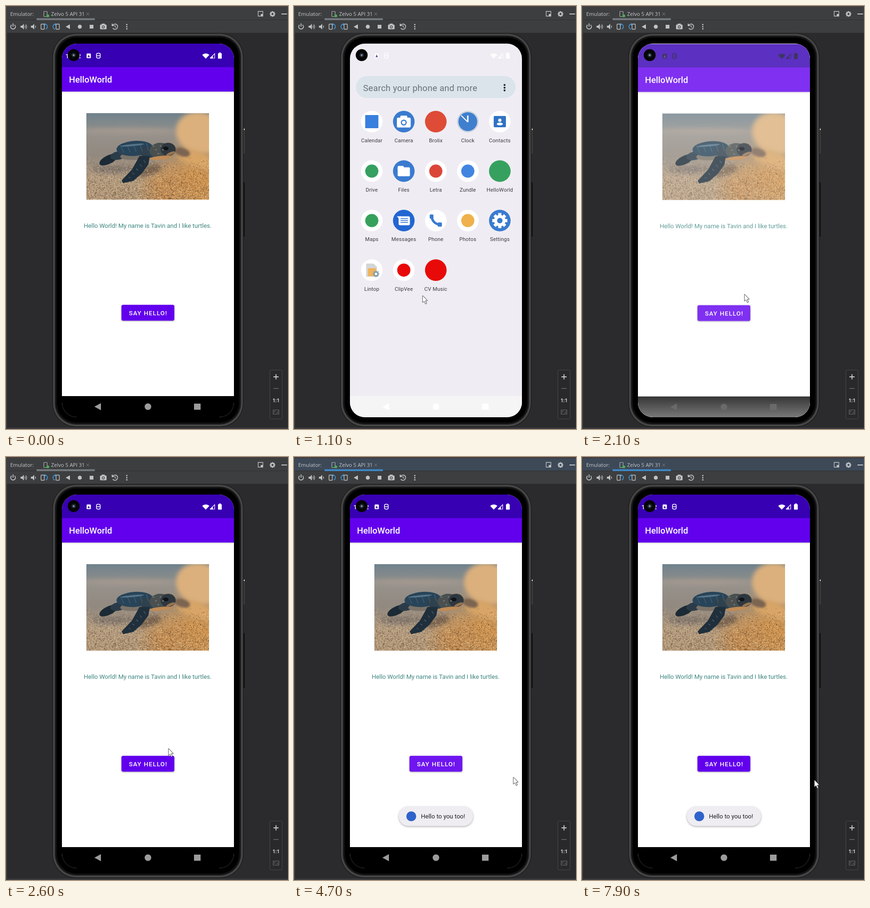
Animation, 600 px wide and 900 px high, one loop 8000 ms. Source, as an HTML page with a canvas:

```html
<!DOCTYPE html>
<html lang="en">
<head>
<meta charset="utf-8">
<title>Emulator demo</title>
<style>
html, body { margin: 0; width: 100%; height: 100%; overflow: hidden; background: #2b2b2e; }
canvas { display: block; width: 600px; height: 900px; }
</style>
</head>
<body>
<canvas id="stage" width="600" height="900"></canvas>
<script>
const LOOP = 8000, STEP = 100;
const UI = '"Open Sans", sans-serif', APP = 'Roboto, sans-serif';
const SCREEN = [119, 80, 366, 795, 32];
let c = document.getElementById('stage').getContext('2d');

const clamp = v => Math.max(0, Math.min(1, v));
const ramp = (t, a, b) => clamp((t - a) / (b - a));
const mix = (a, b, k) => a + (b - a) * k;

// Drawing helpers
function rect(x, y, w, h, color) { c.fillStyle = color; c.fillRect(x, y, w, h); }
function round(x, y, w, h, r, fill, stroke, lw = 1) {
  c.beginPath(); c.roundRect(x, y, w, h, r);
  if (fill) { c.fillStyle = fill; c.fill(); }
  if (stroke) { c.strokeStyle = stroke; c.lineWidth = lw; c.stroke(); }
}
function disc(x, y, r, color) {
  c.beginPath(); c.arc(x, y, r, 0, 7); c.fillStyle = color; c.fill();
}
function oval(x, y, rx, ry, turn, color) {
  c.beginPath(); c.ellipse(x, y, rx, ry, turn, 0, 7); c.fillStyle = color; c.fill();
}
function arc(x, y, r, a, b, color, lw) {
  c.beginPath(); c.arc(x, y, r, a, b); c.strokeStyle = color; c.lineWidth = lw; c.stroke();
}
function poly(points, color) {
  c.beginPath();
  points.forEach(([x, y]) => c.lineTo(x, y));
  c.closePath(); c.fillStyle = color; c.fill();
}
function line(points, color, lw = 1.5) {
  c.beginPath();
  points.forEach(([x, y]) => c.lineTo(x, y));
  c.strokeStyle = color; c.lineWidth = lw; c.stroke();
}
function text(s, x, y, font, color, align = 'left', spacing = 0) {
  c.font = font; c.fillStyle = color; c.textAlign = align;
  c.letterSpacing = spacing + 'px';
  c.fillText(s, x, y);
  c.letterSpacing = '0px';
}
function fade(y0, y1, ...colors) {
  const g = c.createLinearGradient(0, y0, 0, y1);
  colors.forEach((col, i) => g.addColorStop(i / (colors.length - 1), col));
  return g;
}
function layer(w, h, draw) {
  const cv = document.createElement('canvas'), main = c;
  cv.width = w; cv.height = h;
  c = cv.getContext('2d');
  draw();
  c = main;
  return cv;
}
function gear(x, y, r, color, hole) {
  for (let i = 0; i < 8; i++) {
    const a = i * Math.PI / 4;
    line([[x, y], [x + r * Math.cos(a), y + r * Math.sin(a)]], color, r * 0.42);
  }
  disc(x, y, r * 0.76, color);
  disc(x, y, r * 0.36, hole);
}
function camera(x, y, s, color, lens) {
  round(x - 7 * s, y - 4.5 * s, 14 * s, 10 * s, 1.5 * s, color);
  round(x - 3.5 * s, y - 6.5 * s, 7 * s, 4 * s, s, color);
  disc(x, y + 0.5 * s, 3 * s, lens);
  disc(x, y + 0.5 * s, 1.8 * s, color);
}

// Emulator window
function speaker(x, waves) {
  const col = '#bfc1c3';
  poly([[x - 6, 42], [x - 3, 42], [x + 1, 38], [x + 1, 50], [x - 3, 46], [x - 6, 46]], col);
  for (let i = 0; i < waves; i++) arc(x + 1, 44, 3 + i * 3, -0.9, 0.9, col, 1.3);
}
function rotator(x, side) {
  round(x - side * 3 - 3.5, 38.5, 7, 11, 1, null, '#bfc1c3', 1.4);
  c.beginPath(); c.ellipse(x + side * 3, 44, 4, 5, 0, -1.4, 1.4, side < 0);
  c.strokeStyle = '#3b92d4'; c.lineWidth = 1.8; c.stroke();
  poly([[x + side * 1, 36], [x + side * 5, 39], [x + side * 1, 42]], '#3b92d4');
}
function drawWindow(active) {
  const icon = '#bfc1c3', bar = '#3d3e40';
  rect(0, 0, 600, 900, '#2b2b2e');
  rect(0, 0, 600, 57, bar);
  rect(0, 3, 600, 26, active ? '#3d4957' : bar);
  rect(0, 0, 600, 2, '#4a4042');
  rect(0, 29, 600, 1, '#2d3032');
  rect(0, 0, 2, 900, '#434547');
  rect(0, 897, 600, 3, '#3c3a3c');
  text('Emulator:', 9, 21, '11px ' + UI, '#c5c7c9');
  text('Zelvo 5 API 31', 96, 21, '11px ' + UI, '#c5c7c9');
  round(80.5, 11.5, 7, 11, 1, null, '#aeb1b4', 1.2);
  disc(89, 21, 3, '#45b052');
  line([[171, 14], [177, 20]], '#777b7e', 1);
  line([[177, 14], [171, 20]], '#777b7e', 1);
  rect(65, 26, 124, 4, active ? '#3d87c4' : '#73787d');

  round(536.5, 11.5, 10, 10, 0, null, icon, 1.3);
  rect(542, 17, 5, 5, icon);
  gear(567, 17, 6, icon, active ? '#3d4957' : bar);
  rect(586, 16, 12, 2, icon);

  arc(15, 44, 5, -0.9, 4.04, icon, 1.8);
  line([[15, 37], [15, 44]], icon, 1.8);
  speaker(37, 2);
  speaker(59, 1);
  rotator(81, 1);
  rotator(107, -1);
  poly([[127, 44], [136, 39], [136, 49]], icon);
  disc(157, 44, 4.3, icon);
  rect(178, 40, 8, 8, icon);
  camera(207, 44, 1, icon, bar);
  arc(232, 44, 5.6, -2.5, 2.6, icon, 1.6);
  poly([[225, 37], [225, 43], [231, 42]], icon);
  line([[232, 41], [232, 44], [234.5, 45.5]], icon, 1.4);
  for (const y of [39.5, 44, 48.5]) disc(257, y, 1.5, icon);

  round(561.5, 774.5, 26, 104, 2, '#29292b', '#47484a');
  rect(569, 788, 11, 2, '#c8c8c8');
  rect(573.5, 783.5, 2, 11, '#c8c8c8');
  rect(569, 813, 11, 1.5, '#68696b');
  text('1:1', 574.5, 843, 'bold 10.5px ' + UI, '#c8c8c8', 'center');
  round(568.5, 859.5, 12, 9, 0, null, '#68696b', 1.2);
  line([[571, 866], [571, 862], [574, 862]], '#68696b', 1);
  line([[578, 862], [578, 866], [575, 866]], '#68696b', 1);
}

function drawPhone() {
  rect(504, 260, 4, 54, '#3e3e40');
  rect(506, 261, 2, 3, '#d0d0d0');
  rect(504, 375, 4, 116, '#111112');
  // Rounded metal rim: dark edge, a soft highlight, then black glass.
  for (let d = 0; d <= 10; d++) {
    const v = Math.round(14 + 64 * Math.exp(-((d - 3) ** 2) / 6)) * (d < 10);
    round(98.5 + d, 57.5 + d, 407 - 2 * d, 838.5 - 2 * d, 51 - d, `rgb(${v},${v},${v})`);
  }
}

// Phone screens
function statusIcons(color, alpha) {
  c.globalAlpha *= alpha;
  round(171.5, 101, 9, 10, 1.5, color);
  poly([[176, 103], [178.5, 109], [173.5, 109]], '#41338f');
  round(192.5, 100.5, 8, 10.5, 3, null, color, 1.5);
  line([[192, 105.7], [201, 105.7]], color, 1.4);
  c.beginPath(); c.moveTo(425, 112);
  c.arc(425, 112, 11, -2.34, -0.8); c.closePath();
  c.fillStyle = color; c.fill();
  line([[434.2, 111], [444, 111], [444, 101.5], [434.2, 111]], color, 1.2);
  poly([[434, 111.5], [440, 111.5], [440, 106]], color);
  round(451, 100.5, 8, 11.5, 1, color);
  rect(453, 99, 4, 2, color);
  c.globalAlpha /= alpha;
}
function navKeys(color) {
  poly([[188, 852.5], [202, 845], [202, 860]], color);
  disc(302, 852.5, 7, color);
  rect(400, 846, 14, 13, color);
}
function lens() {
  disc(144, 104.5, 12.7, '#050506');
  disc(144, 104.5, 5, '#1b222d');
  disc(144, 104.5, 2.6, '#4e596b');
  disc(144, 104.5, 1.2, '#a9b2c0');
}

const photo = layer(261, 184, () => {
  rect(0, 0, 261, 184, fade(0, 184, '#70828c', '#96918b', '#92897f', '#b39c80', '#b2987a'));
  const glow = (x, y, r, col) => {
    const g = c.createRadialGradient(x, y, r * 0.2, x, y, r);
    g.addColorStop(0, col + 'ff'); g.addColorStop(1, col + '00');
    rect(0, 0, 261, 184, g);
  };
  glow(235, 150, 110, '#cf9450');
  glow(170, 165, 65, '#c48d52');
  c.filter = 'blur(5px)';
  oval(90, 38, 110, 6, 0, '#a59a90');
  oval(242, 42, 52, 44, 0.3, '#dcb07c');
  oval(235, 98, 45, 16, 0.3, '#d8a566');
  oval(60, 119, 52, 8, 0, '#85796f');
  oval(133, 122, 28, 9, -0.3, '#77624f');
  c.filter = 'blur(2px)';
  oval(204, 83, 17, 9, 0.3, '#7c6452');
  c.filter = 'none';
  let seed = 7;
  const rnd = () => (seed = seed * 16807 % 2147483647) / 2147483647;
  for (let i = 0; i < 4200; i++) {
    const y = 92 + 92 * Math.sqrt(rnd());
    rect(261 * rnd(), y, 1.5, 1.5, rnd() < 0.5 ? 'rgba(250,220,170,.36)' : 'rgba(65,45,32,.34)');
  }
  c.filter = 'blur(.6px)';
  oval(47, 99, 21, 9, -0.45, '#1c2a36');
  oval(68, 90, 17, 9, -0.2, '#2b3c49');
  oval(106, 90, 34, 9, -0.08, '#7b7368');
  oval(103, 75, 39, 16, -0.06, '#284459');
  oval(130, 83, 18, 12, 0.2, '#2f414e');
  poly([[113, 91], [135, 91], [132, 109], [118, 128], [100, 144], [78, 149], [75, 143], [97, 120]], '#1f2f3c');
  oval(156, 79, 22, 16, -0.1, '#49504f');
  oval(174, 77, 16, 14, 0, '#2f373e');
  oval(158, 95, 24, 4, -0.1, '#c08b56');
  oval(179, 86, 10, 3, -0.4, '#987453');
  oval(169, 75, 6, 4, 0.1, '#0f151b');
  // Shell plates and scales
  c.filter = 'none';
  for (let i = 0; i < 5; i++) {
    line([[72 + i * 14, 68 - i], [80 + i * 13, 84 - i]], '#4c6a7e', 1);
    oval(143 + i * 5, 70 + (i % 3) * 8, 2.2, 1.6, 0, '#747168');
    line([[122 - i * 8, 100 + i * 9], [126 - i * 8, 106 + i * 8]], '#55636b', 1.2);
  }
  oval(98, 68, 25, 2, -0.1, '#57758a');
});

function drawButton(press) {
  c.save();
  c.shadowColor = 'rgba(0,0,0,.3)'; c.shadowBlur = 3; c.shadowOffsetY = 1.3;
  round(245.6, 635.7, 112.6, 33.8, 3.7, '#6200ee');
  c.restore();
  if (press > 0 && press < 1) {
    c.save();
    c.beginPath(); c.roundRect(245.6, 635.7, 112.6, 33.8, 3.7); c.clip();
    c.globalAlpha *= 0.28 * (1 - ramp(press, 0.5, 1));
    disc(314, 655, 12 + 140 * Math.min(1, press * 1.8), '#fff');
    c.restore();
  }
  text('SAY HELLO!', 302.5, 658, '500 13.2px ' + APP, '#fff', 'center', 1.17);
}

function drawToast(show) {
  if (show <= 0) return;
  const s = mix(0.95, 1, show);
  c.save();
  c.translate(302, 764.5); c.scale(s, s); c.translate(-302, -764.5);
  c.globalAlpha = clamp(show * 1.6);
  c.shadowColor = 'rgba(0,0,0,.32)'; c.shadowBlur = 4; c.shadowOffsetY = 1.5;
  round(223, 743.5, 158, 41.5, 20.7, '#efedf2');
  c.shadowColor = 'transparent';
  c.globalAlpha = show;
  disc(249.5, 764.5, 10.5, '#2f62cb');
  text('Hello to you too!', 270, 769, '13px ' + APP, '#1f1f21');
  c.restore();
}

function drawApp(t) {
  const launching = t >= 1800 && t < 2400;
  rect(119, 80, 366, 795, '#fff');
  rect(119, 830, 366, 45, launching ? fade(830, 875, '#080808', '#5c5c5c') : '#000');
  rect(119, 80, 366, 50, '#3700b3');
  c.save();
  c.shadowColor = 'rgba(0,0,0,.25)'; c.shadowBlur = 3; c.shadowOffsetY = 1;
  rect(119, 130, 366, 52, '#6200ee');
  c.restore();
  rect(119, 129, 366, 1, '#3700b3');
  text('HelloWorld', 134, 163, '500 18.6px ' + APP, '#fff');
  c.drawImage(photo, 171, 228);
  text('Hello World! My name is Tavin and I like turtles.', 301.5, 472, '13px ' + APP, '#3b8580', 'center');
  drawButton(t < 5600 ? ramp(t, 3850, 4850) : ramp(t, 6850, 7500));
  if (t < 1000 || t >= 2700) text('12:52', 126.5, 110.5, '500 13px ' + APP, '#fff');
  statusIcons(launching ? '#10083c' : '#fff', 1);
  navKeys(launching ? '#484848' : '#9c9c9c');
}

// Launcher icons: each draws around (0, 0)
const blue = '#3a7bd0', white = '#fff';
const mark = color => () => { disc(0, 0, 23, white); disc(0, 0, 14, color); };
const apps = [
  ['Calendar', () => { disc(0, 0, 23, white); rect(-14, -14, 28, 28, '#397fdd'); }],
  ['Camera', () => { disc(0, 0, 23, blue); camera(0, 1, 2.1, white, blue); }],
  ['Brolix', () => disc(0, 0, 23, '#de4b37')],
  ['Clock', () => {
    disc(0, 0, 23, '#cbd3df'); disc(0, 0, 20, '#3f7fce');
    line([[-14, -13], [0, 1]], white, 2); line([[0, -13], [0, 1]], white, 3);
  }],
  ['Contacts', () => {
    disc(0, 0, 23, white); round(-13, -12, 26, 24, 2, '#2f72c4');
    disc(0, -3, 3.5, white); oval(0, 5, 6.5, 3, 0, white);
  }],
  ['Drive', mark('#35a060')],
  ['Files', () => {
    disc(0, 0, 23, blue); round(-13, -11, 13, 10, 2, white); round(-13, -8, 26, 19, 2, white);
  }],
  ['Letra', mark('#dc4638')],
  ['Zundle', mark('#4285e0')],
  ['HelloWorld', () => disc(0, 0, 23, '#36a15f')],
  ['Maps', mark('#35a15b')],
  ['Messages', () => {
    disc(0, 0, 23, '#2266d2'); round(-11, -9, 24, 19, 3, white);
    poly([[-15, -9], [-6, -9], [-6, 0]], white);
    for (const y of [-4, 0, 4]) line([[-7, y], [9, y]], '#2266d2', 1.5);
  }],
  ['Phone', () => {
    disc(0, 0, 23, white);
    c.beginPath(); c.moveTo(-9, -9); c.quadraticCurveTo(-7, 6, 9, 9);
    c.strokeStyle = blue; c.lineWidth = 5; c.stroke();
    round(-13, -13, 8, 9, 2, blue); round(4, 4, 9, 9, 2, blue);
  }],
  ['Photos', mark('#efb14b')],
  ['Settings', () => { disc(0, 0, 23, blue); gear(0, 0, 16, white, blue); }],
  ['Lintop', () => {
    disc(0, 0, 23, white);
    poly([[-12, -14], [4, -14], [11, -7], [11, 14], [-12, 14]], '#d3d6d9');
    rect(-8, -4, 17, 17, '#f0b35c'); gear(9, 8, 7, '#87a0ad', white);
  }],
  ['ClipVee', mark('#e80a08')],
  ['CV Music', () => disc(0, 0, 23, '#e80a08')]
];
function drawDrawer() {
  rect(119, 80, 366, 795, '#efedf3');
  rect(119, 830, 366, 45, '#f5f5f6');
  navKeys('#fff');
  statusIcons('#fff', 0.85);
  round(131.5, 149, 340, 47, 23.5, '#dce4eb');
  text('Search your phone and more', 147, 181, '18.6px ' + APP, '#68707a', 'left', 0.25);
  for (const y of [168, 173.8, 179.6]) disc(448, y, 2.1, '#202124');
  apps.forEach(([name, draw], i) => {
    c.save();
    c.translate(165.5 + 68.1 * (i % 5), 246 + 105.3 * Math.floor(i / 5));
    draw();
    text(name, 0, 43.8, '11.2px ' + APP, '#3c3c40', 'center', 0.15);
    c.restore();
  });
}

// A white window grows out of its launcher icon while the app fades in on it.
function drawLaunch(t) {
  const k = 1 - Math.pow(1 - ramp(t, 1750, 2100), 3);
  const x = mix(415, 119, k), y = mix(328, 80.7, k);
  const w = mix(46, 366, k), h = mix(46, 795, k);
  c.beginPath(); c.roundRect(x, y, w, h, mix(23, 30, k)); c.clip();
  rect(x, y, w, h, '#fff');
  const app = layer(600, 900, () => drawApp(t));
  c.globalAlpha = mix(0.81 * ramp(t, 1850, 2100), 1, ramp(t, 2100, 2400));
  c.translate(x, y); c.scale(w / 366, w / 366);
  c.drawImage(app, -119, -80);
}

function drawScreen(t) {
  c.save();
  c.beginPath(); c.roundRect(...SCREEN); c.clip();
  if (t < 1000 || t >= 2400) drawApp(t);
  else {
    drawDrawer();
    c.save();
    if (t >= 1800) drawLaunch(t);
    c.restore();
  }
  c.restore();
  lens();
}

// Pointer path: time, x, y
const path = [
  [1000, 264, 634], [1100, 273, 616], [1600, 435, 352], [1800, 435, 352],
  [2100, 345, 613], [2600, 345, 620], [3200, 312, 664], [3500, 313, 654],
  [4100, 313, 654], [4600, 466, 681], [6300, 466, 681], [6700, 320, 656],
  [7300, 320, 656], [7900, 494, 687]
];
function drawPointer(t) {
  if (t < path[0][0]) return;
  const i = Math.max(1, path.findIndex(p => p[0] >= t));
  const [a, ax, ay] = path[i - 1], [b, bx, by] = path[i];
  const k = ramp(t, a, b), e = k * k * (3 - 2 * k);
  c.save();
  c.translate(mix(ax, bx, e), mix(ay, by, e));
  c.shadowColor = 'rgba(0,0,0,.3)'; c.shadowBlur = 2; c.shadowOffsetX = 1;
  poly([[0.5, 0], [0.5, 15], [4, 12], [6.5, 18], [9, 17], [6.5, 11], [11, 11]], '#fff');
  c.shadowColor = 'transparent';
  c.strokeStyle = '#4c4c50'; c.lineWidth = 0.9; c.stroke();
  c.restore();
}

function toastLevel(t) {
  const first = ramp(t, 4000, 4300) * (1 - ramp(t, 6200, 6450));
  return Math.max(first, ramp(t, 7250, 7550));
}

function frame(now) {
  const t = Math.floor(now % LOOP / STEP) * STEP;
  drawWindow(t >= 3900);
  drawPhone();
  drawScreen(t);
  drawToast(toastLevel(t));
  drawPointer(t);
  requestAnimationFrame(frame);
}
requestAnimationFrame(frame);
</script>
</body>
</html>
```
